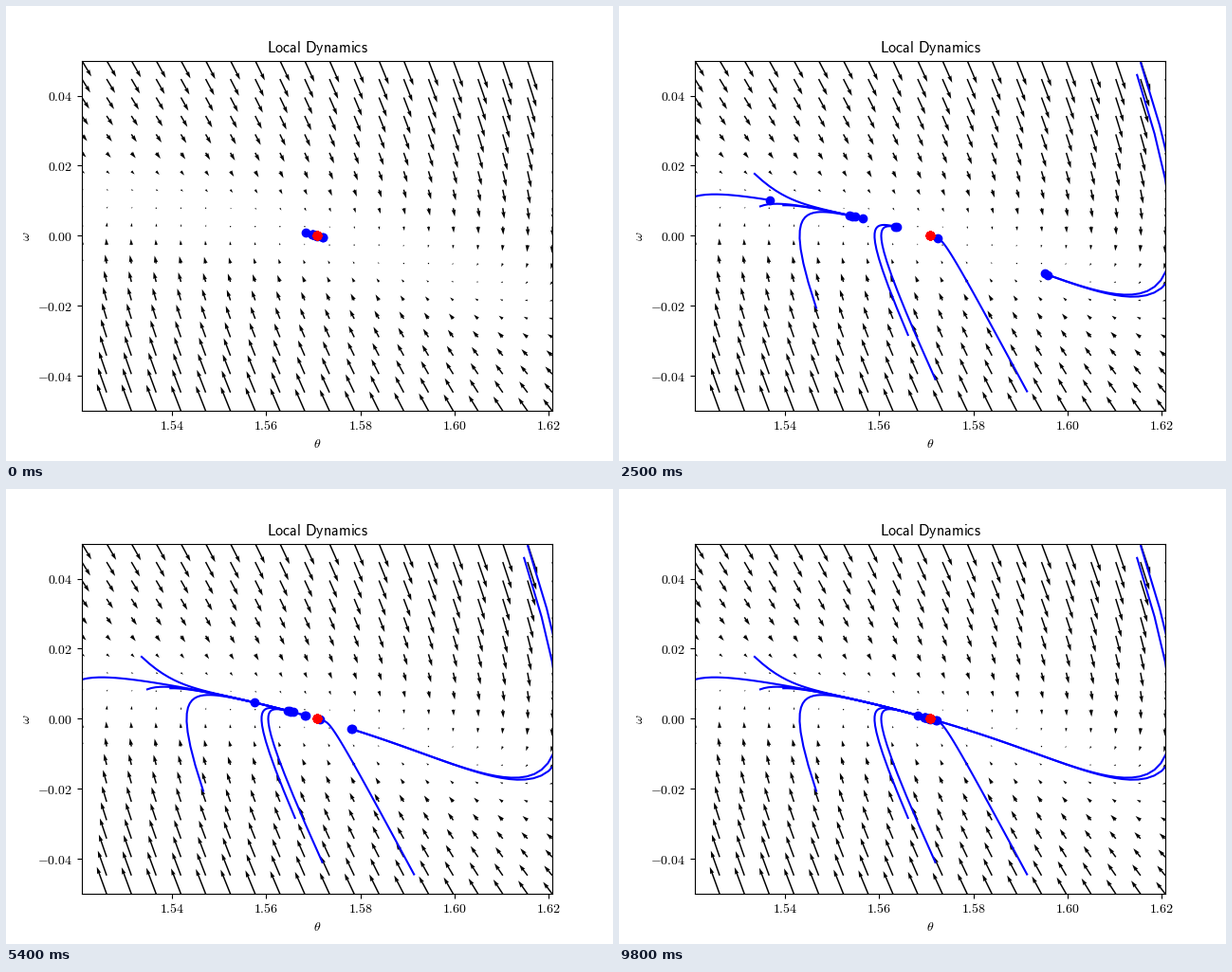
Write a matplotlib script that moves like this. It is 640 px wide and 480 px high and loops after 9900 ms.

```python
import matplotlib.pyplot as plt
import numpy as np
from matplotlib.animation import FuncAnimation

plt.rcParams["mathtext.fontset"] = "cm"

GOAL = np.pi / 2
SPAN = 0.05
GRAVITY = 9.8
DT = 0.1
STEPS = 100
FRAMES = 99

# Release points: theta relative to the goal, and omega.
STARTS = np.array([
    (0.0206, -0.0444), (0.0011, -0.0409), (-0.0047, -0.0283),
    (-0.0242, -0.0206), (-0.0373, 0.0177), (-0.0361, 0.0084),
    (-0.0312, 0.0087), (0.0448, 0.0493), (0.0440, 0.0459),
    (-0.0520, -0.0220),
])


def accel(theta, omega):
    """Pendulum held at the goal by constant torque plus PD feedback."""
    return GRAVITY * (np.sin(theta) - 1) - (theta - GOAL) - 3 * omega


def flow(state):
    theta, omega = state
    return np.array([omega, accel(theta, omega)])


def rk4(state):
    k1 = flow(state)
    k2 = flow(state + DT / 2 * k1)
    k3 = flow(state + DT / 2 * k2)
    k4 = flow(state + DT * k3)
    return state + DT / 6 * (k1 + 2 * k2 + 2 * k3 + k4)


# All pendulums advance together: history has shape (step, variable, pendulum).
history = [STARTS.T + [[GOAL], [0]]]
for _ in range(STEPS - 1):
    history.append(rk4(history[-1]))
history = np.array(history)

fig, ax = plt.subplots(figsize=(6.4, 4.8), dpi=100)

offsets = np.linspace(-SPAN, SPAN, 20)
theta, omega = np.meshgrid(GOAL + offsets, offsets)
ax.quiver(theta, omega, omega, accel(theta, omega), angles="xy")

lines = [ax.plot([], [], "b-", lw=1.5)[0] for _ in STARTS]
dots = [ax.plot([], [], "bo", zorder=2.1)[0] for _ in STARTS]
for _ in STARTS:
    ax.plot([GOAL], [0], "ro", zorder=2.2)

ax.set_xlim(GOAL - SPAN, GOAL + SPAN)
ax.set_ylim(-SPAN, SPAN)
ax.set_xticks(np.arange(1.54, 1.621, 0.02))
ax.set_yticks(0.02 * np.arange(-2, 3))
for axis in (ax.xaxis, ax.yaxis):
    axis.set_major_formatter(lambda v, pos: f"${v:.2f}$")
ax.tick_params(axis="x", pad=2.8)
ax.set_xlabel(r"$\theta$", labelpad=3.3)
ax.set_ylabel(r"$\omega$")
ax.set_title(r"$\mathsf{Local\ Dynamics}$", fontsize=11.6, pad=6.4)


def update(i):
    # At i = 0 the index wraps, so the dots rest at their end points.
    for n, (line, dot) in enumerate(zip(lines, dots)):
        line.set_data(history[:i, 0, n], history[:i, 1, n])
        dot.set_data(history[i - 1, :, n, None])
    return lines + dots


ani = FuncAnimation(fig, update, frames=FRAMES, interval=100, repeat=True,
                    repeat_delay=0, blit=False)

plt.show()
```
